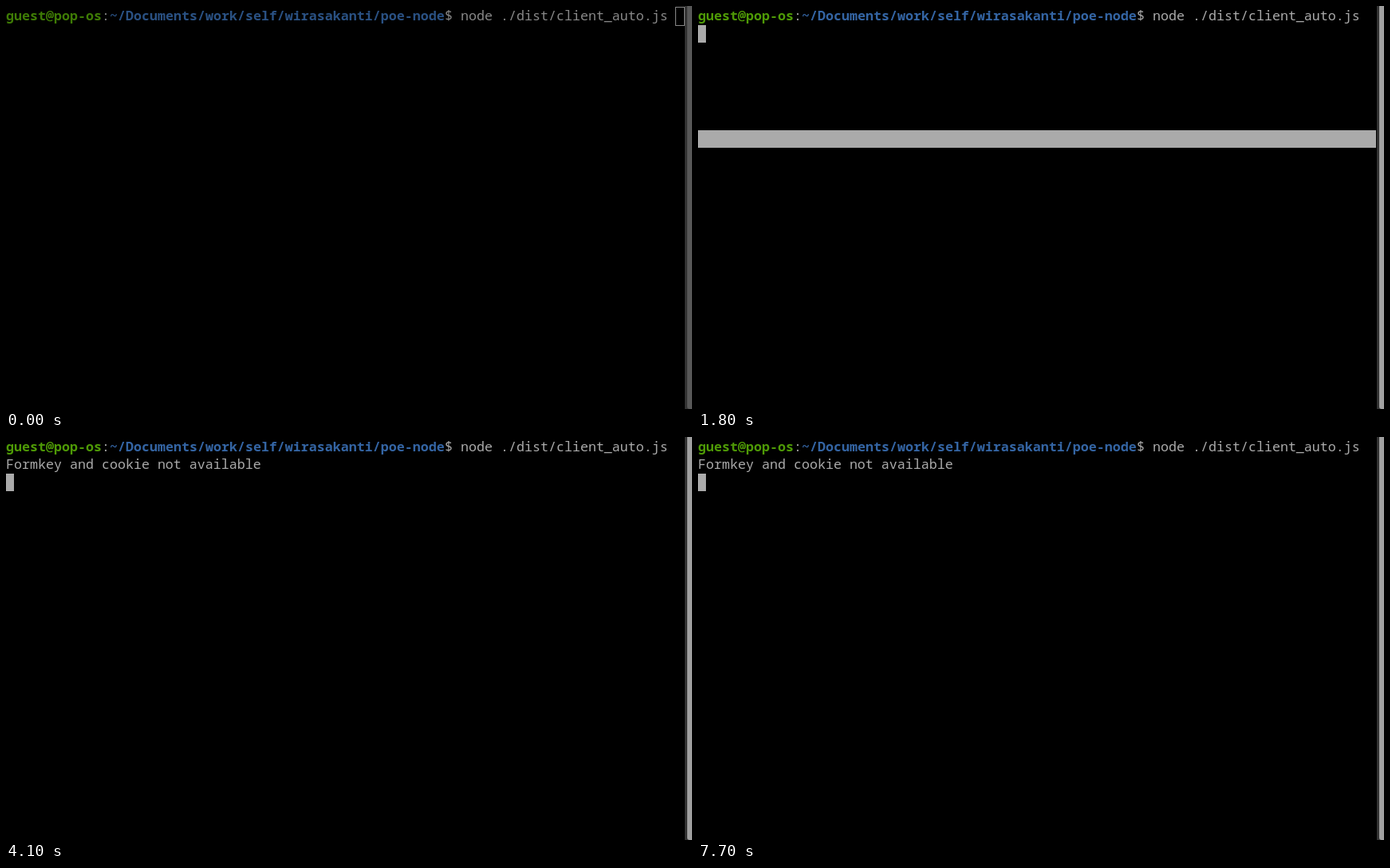
An HTML page that plays this animation: 860 px wide and 506 px high, repeating every 8000 ms.

```html
<!DOCTYPE html>
<html lang="en">
<head>
<meta charset="utf-8">
<title>Terminal</title>
<style>
  html, body { margin: 0; width: 100%; height: 100%; overflow: hidden; background: #000; }
  svg { display: block; width: 860px; height: 506px; }
  text {
    font: 400 16.6667px "Noto Sans Mono", "DejaVu Sans Mono", monospace;
    font-variant-ligatures: none;
    white-space: pre;
    fill: var(--fg);
  }
  .user, .path { font-weight: 700; }
  .user { fill: var(--green); }
  .path { fill: var(--blue); }
  #bar, #block { fill: var(--fg); }
  #outline { fill: none; stroke: var(--fg); }
</style>
</head>
<body>
<svg id="screen" viewBox="0 0 860 506">
  <rect width="860" height="506" fill="#000"/>
  <rect id="bar" y="156" width="850" height="22"/>
  <text class="user" x="0" y="18">guest@pop-os</text>
  <text x="120" y="18">:</text>
  <text class="path" x="130" y="18">~/Documents/work/self/wirasakanti/poe-node</text>
  <text x="550" y="18">$ node ./dist/client_auto.js</text>
  <text id="output" x="0" y="40">Formkey and cookie not available</text>
  <rect x="851" width="9" height="506" fill="#333"/>
  <path id="slider" d="M854 0H860V506H857Q854 506 854 503Z"/>
  <rect id="outline" x="839.5" y="1.5" width="11" height="23"/>
  <rect id="block" width="10" height="22"/>
</svg>
<script>
const LOOP = 8000;
const BLINK = 600;
const BLINK_START = 2300;
const $ = id => document.getElementById(id);
const show = (id, on) => $(id).setAttribute("visibility", on ? "visible" : "hidden");

const themes = {
  blurred: { fg: "#888", green: "#3e7b05", blue: "#2a5183" },
  focused: { fg: "#aaa", green: "#4e9a06", blue: "#3465a4" }
};

// start time, theme, slider colour, bar, output, cursor column and row
const steps = [
  [0, "blurred", "#585858", false, false, 84, 0],
  [800, "blurred", "#585858", true, false, 84, 0],
  [1200, "focused", "#585858", true, false, 84, 0],
  [1300, "focused", "#7e7e7e", true, false, 84, 0],
  [1400, "focused", "#a0a0a0", true, false, 84, 0],
  [1800, "focused", "#a0a0a0", true, false, 0, 1],
  [1900, "focused", "#a0a0a0", false, false, 0, 1],
  [2000, "focused", "#a0a0a0", false, true, 0, 2]
];

function render(t) {
  const [, theme, slider, bar, output, col, row] = steps.findLast(s => s[0] <= t);
  const focused = theme === "focused";
  const lit = t < BLINK_START || Math.floor((t - BLINK_START) / BLINK) % 2 === 1;

  for (const [name, colour] of Object.entries(themes[theme]))
    $("screen").style.setProperty("--" + name, colour);
  $("slider").setAttribute("fill", slider);
  show("bar", bar);
  show("output", output);
  show("outline", !focused);
  show("block", focused && lit);
  $("block").setAttribute("x", col * 10);
  $("block").setAttribute("y", 2 + row * 22);
}

const start = performance.now();
function tick() {
  render((performance.now() - start) % LOOP);
  requestAnimationFrame(tick);
}
tick();
</script>
</body>
</html>
```
